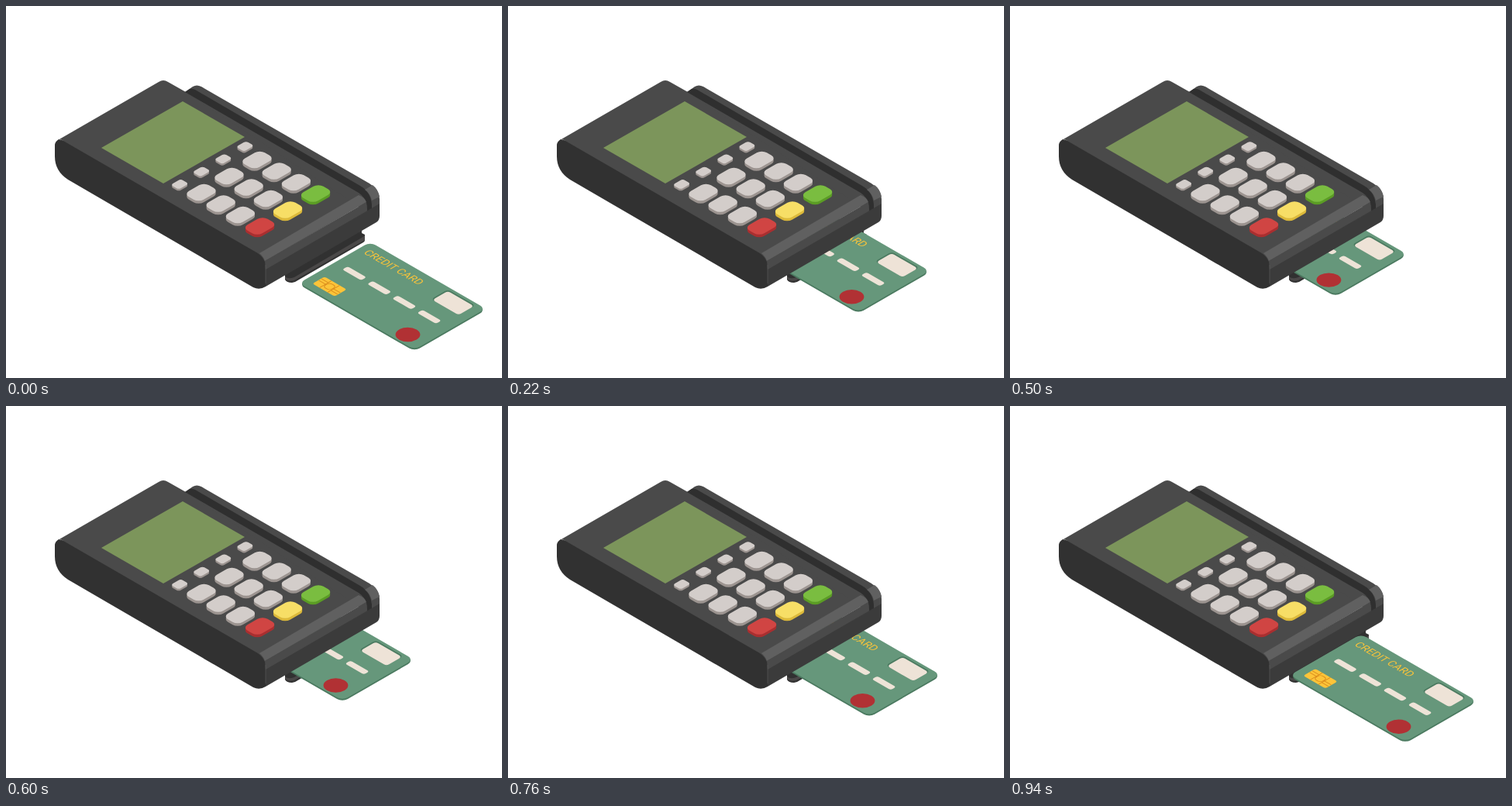
These frames come from a looping animation (640 by 480 pixels, 1420 ms). An HTML page:

```html
<!DOCTYPE html>
<html lang="en">
<head>
<meta charset="utf-8">
<title>Card payment</title>
<style>
html, body { margin: 0; width: 100%; height: 100%; overflow: hidden; background: #fff; }
svg { display: block; width: 640px; height: 480px; }
text { font: 400 13.5px Roboto, Arial, sans-serif; }
</style>
</head>
<body>
<svg viewBox="0 0 640 480" xmlns="http://www.w3.org/2000/svg">
  <g id="slot">
    <path fill="#313131" d="M360 345V353Q362 357 369 357L373 356L461 305Q463 304 463 302V295L459 293V286Z"/>
    <path fill="#4a4848" d="M360 349Q364 353 372 350L459 299L463 296V302L372 354Q364 356 360 352Z"/>
  </g>
  <g id="card"></g>
  <g id="reader">
    <path fill="#313131" d="M63 180Q63 175 68 172L100 180L325 309L340 330L335 362Q327 367 319 363L80 224Q63 213 63 194Z"/>
    <path fill="#4a4a4a" d="M67 173L197 98Q203 94 209 98L232 111L464 244L466 252L334 330Q331 323 325 319L74 174Q70 171 67 173Z"/>
    <path fill="#4a4a4a" d="M231 111L241 104Q246 101 252 104L469 229Q482 237 482 249V260L466 266Z"/>
    <path fill="#2f2f2f" d="M231 111L237 107Q240 106 244 108L457 232Q471 240 472 257V264L466 266Q467 249 455 241Z"/>
    <path fill="#606060" d="M327 319L455 244Q463 247 465 253L334 329Q332 323 327 319Z"/>
    <path fill="#606060" d="M463 237L473 231Q480 236 482 246L472 251Q470 242 463 237Z"/>
    <path fill="#4a4a4a" d="M334 329L465 253L466 265L335 341Z"/>
    <path fill="#3b3b3b" d="M335 340L482 255V271Q482 276 478 279L335 362Z"/>
    <path fill="none" stroke="#5a5a5a" stroke-width=".7" d="M335 334V358"/>
    <path fill="#7c955b" d="M228 123L308 169L203 229L123 183Z"/>
    <g id="keys"></g>
  </g>
</svg>
<script>
const $ = id => document.getElementById(id);
const LOOP = 1420, STEP = 20;

// Wraps content in the isometric plane at (x, y).
const iso = (x, y, body) =>
  `<g transform="matrix(.866 .5 -.866 .5 ${x} ${y})">${body}</g>`;
const box = (w, h, r, fill) =>
  `<rect x="${-w / 2}" y="${-h / 2}" width="${w}" height="${h}" rx="${r}" fill="${fill}"/>`;
const slab = (x, y, w, h, r, fill, side, depth) =>
  iso(x, y + depth, box(w, h, r, side)) +
  iso(x, y + depth / 2, box(w, h, r, side)) +
  iso(x, y, box(w, h, r, fill));

function drawKeys() {
  const grey = ['#d3cdca', '#9c9490'];
  const action = [['#7abd40', '#5b9c25'], ['#f7de66', '#dcb93a'], ['#d04543', '#a92f30']];
  let out = '';
  for (let i = 0; i < 4; i++)
    out += slab(308.4 - 28.1 * i, 181 + 16.3 * i, 12, 15, 3.5, ...grey, 2.5);
  for (let row = 0; row < 3; row++)
    for (let i = 0; i < 4; i++)
      out += slab(324 + 25.2 * i - 36 * row, 198.5 + 14.5 * i + 21 * row,
        22, 30, 7.5, ...(i < 3 ? grey : action[row]), 3.5);
  $('keys').innerHTML = out;
}

function drawCard() {
  const cream = '#eee3d7', gold = '#fcc439';
  let out = slab(498.5, 374, 172, 106, 8, '#66977b', '#4b7a60', 2);
  out += iso(460.5, 318.7, `<text fill="${gold}">CREDIT CARD</text>`);
  for (let i = 0; i < 4; i++)
    out += iso(449.5 + 32.2 * i, 345 + 18.7 * i, box(28, 8, 3, cream));
  out += iso(577, 382.3, box(41, 25, 4.5, '#4b7a60')) + iso(577, 383.3, box(39, 23, 4, cream));
  out += iso(417.5, 362, box(33, 18, 3, gold) +
    `<path fill="none" stroke="#d98a1c" stroke-width="1" d="M-16 0H-5M5 0H16M-6 -9V9M6 -9V9M-6 -4H-16M6 4H16"/>
     <rect x="-5" y="-5" width="10" height="10" rx="4" fill="${gold}" stroke="#d98a1c"/>`);
  out += iso(518.5, 424, '<circle r="13" fill="#b13134"/>');
  $('card').innerHTML = out;
}

// Card path: step, dx, dy
const path = [
  [0, 0, 0], [3, -25, -16.3], [9, -75, -48.7], [17, -110, -70],
  [28, -93, -63.5], [36, -61, -43.7], [45, -17, -10.3]
];

const rate = (i, c) => (path[i + 1][c] - path[i][c]) / (path[i + 1][0] - path[i][0]);

function slope(i, c) {
  if (i === 0) return rate(0, c);
  if (i === path.length - 1) return rate(i - 1, c);
  const a = path[i][0] - path[i - 1][0], b = path[i + 1][0] - path[i][0];
  return (b * rate(i - 1, c) + a * rate(i, c)) / (a + b);
}

function at(k, c) {
  let i = 0;
  while (i < path.length - 2 && k > path[i + 1][0]) i++;
  const h = path[i + 1][0] - path[i][0], s = (k - path[i][0]) / h, q = 1 - s;
  return path[i][c] * (1 + 2 * s) * q * q + path[i + 1][c] * s * s * (3 - 2 * s) +
    h * s * q * (q * slope(i, c) - s * slope(i + 1, c));
}

function render(t) {
  const k = Math.max(0, Math.min(45, Math.floor(t / STEP) - 2));
  $('card').setAttribute('transform', `translate(${at(k, 1).toFixed(2)} ${at(k, 2).toFixed(2)})`);
}

drawKeys();
drawCard();
render(0);
const start = performance.now();
(function tick() {
  render((performance.now() - start) % LOOP);
  requestAnimationFrame(tick);
})();
</script>
</body>
</html>
```
